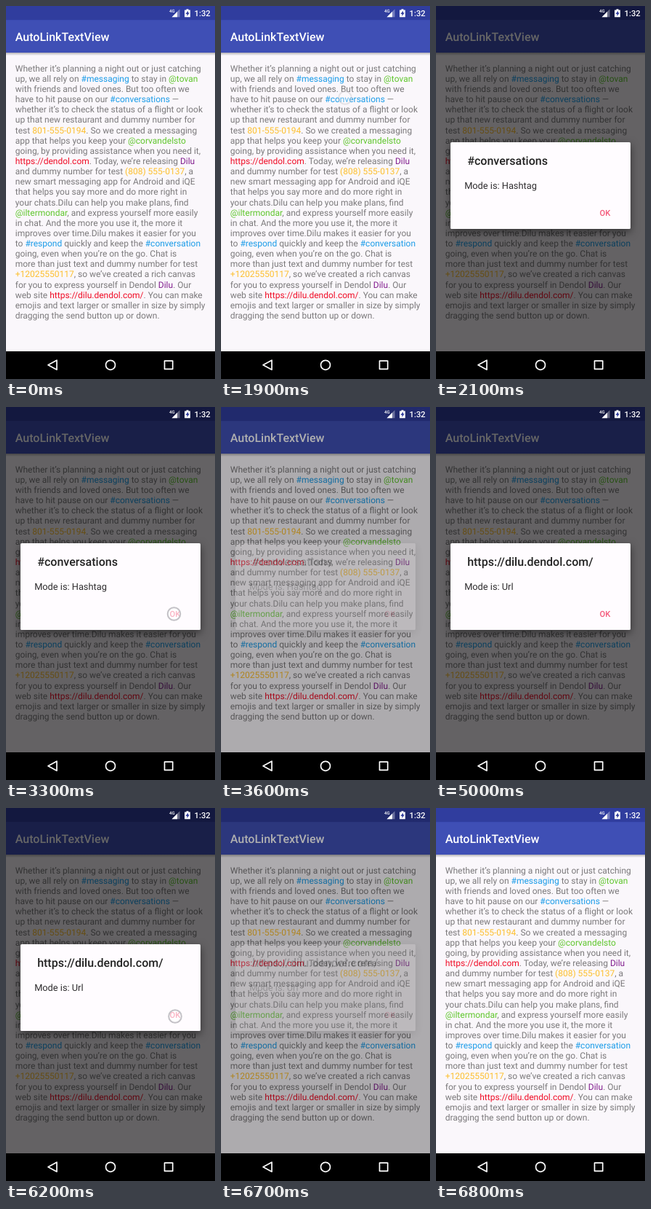
An HTML page that plays this animation: 288x512 px, repeating every 8 s.

```html
<!DOCTYPE html>
<html lang="en">
<head>
<meta charset="utf-8">
<title>AutoLinkTextView</title>
<style>
  html, body { margin: 0; width: 100%; height: 100%; overflow: hidden; background: #000; }
  svg { display: block; width: 288px; height: 512px; }
  /* the tiny turn keeps baselines from snapping to whole pixels */
  text {
    font-family: Roboto, sans-serif; white-space: pre;
    text-rendering: geometricPrecision; transform: rotate(.01deg);
  }
  .bold { font-weight: 500; }
  #body { font-size: 12px; fill: #7b797b; }
  .hash { fill: #1b9ce8; }
  .at { fill: #5fc62c; }
  .tel { fill: #fdbf2d; }
  .url { fill: #f00c26; }
  .own { fill: #83208f; }
  .pressed { fill: #c6c3c7; }
  #dialog rect { filter: drop-shadow(0 4px 6px rgba(0, 0, 0, .5)); }
  #ring { fill: rgba(255, 255, 255, .55); stroke: #c3c1c6; stroke-width: 2; }
</style>
</head>
<body>
<svg viewBox="0 0 288 512">
  <defs>
    <linearGradient id="shade" x2="0" y2="1">
      <stop stop-opacity=".28"/>
      <stop offset="1" stop-opacity="0"/>
    </linearGradient>
  </defs>

  <rect width="288" height="512" fill="#faf7fb"/>
  <rect y="64" width="288" height="4" fill="url(#shade)"/>
  <rect width="288" height="64" fill="#3f4fb5"/>
  <rect width="288" height="19.2" fill="#303d9e"/>
  <text class="bold" x="12.8" y="48" font-size="16" fill="#fff">AutoLinkTextView</text>
  <g id="body"></g>

  <rect id="dim" width="288" height="474" opacity="0"/>

  <g id="dialog" opacity="0">
    <rect x="20" y="187" width="248" height="119" rx="1.6" fill="#fffcff"/>
    <text id="title" class="bold" x="43.2" y="218" font-size="16" fill="#222"></text>
    <text id="mode" x="39.2" y="250.5" font-size="12.8" fill="#2e2c2e"></text>
    <text id="ok" class="bold" x="233" y="288" font-size="11.2" text-anchor="middle" fill="#f4587a">OK</text>
  </g>
  <circle id="ring" r="8.8" opacity="0"/>

  <g fill="#fff">
    <path d="M228.5 15.2L239.5 4.2V15.2Z" opacity=".35"/>
    <path d="M228.5 15.2L236 7.7V15.2Z"/>
    <text class="bold" x="225" y="9" font-size="6">4G</text>
    <path d="M248.5 4.2h3v1.2h2.4v9.8h-7.8V5.4h2.4Z"/>
    <text class="bold" x="259.6" y="13.6" font-size="11.2">1:32</text>
  </g>
  <path d="M251 6.4L247.4 11.1H249.5V14L252.8 9.2H251Z" fill="#303d9e"/>

  <rect y="474" width="288" height="38"/>
  <g fill="none" stroke="#fff" stroke-width="1.7" stroke-linejoin="round">
    <path d="M58 492.7L70 486.2V499.2Z"/>
    <circle cx="144" cy="492.8" r="6.5"/>
    <rect x="218.5" y="487.1" width="11.2" height="11.2"/>
  </g>
</svg>

<script>
const $ = id => document.getElementById(id);
const SITE = "https://dilu.dendol.com/";

// [kind|text] marks a coloured link
const lines = `Whether it’s planning a night out or just catching
up, we all rely on [hash|#messaging] to stay in [at|@tovan]
with friends and loved ones. But too often we
have to hit pause on our [hash|#conversations] —
whether it’s to check the status of a flight or look
up that new restaurant and dummy number for
test [tel|801-555-0194]. So we created a messaging
app that helps you keep your [at|@corvandelsto]
going, by providing assistance when you need it,
[url|https://dendol.com]. Today, we’re releasing [own|Dilu]
and dummy number for test [tel|(808) 555-0137], a
new smart messaging app for Android and iQE
that helps you say more and do more right in
your chats.Dilu can help you make plans, find
[at|@iltermondar], and express yourself more easily
in chat. And the more you use it, the more it
improves over time.Dilu makes it easier for you
to [hash|#respond] quickly and keep the [hash|#conversation]
going, even when you’re on the go. Chat is
more than just text and dummy number for test
[tel|+12025550117], so we’ve created a rich canvas
for you to express yourself in Dendol [own|Dilu]. Our
web site [url|${SITE}]. You can make
emojis and text larger or smaller in size by simply
dragging the send button up or down.`.split("\n");

$("body").innerHTML = lines.map((line, i) => {
  const spans = line.replace(/\[(\w+)\|([^\]]+)\]/g, '<tspan class="$1">$2</tspan>');
  return `<text x="12.8" y="${(89.8 + i * 14.133).toFixed(2)}">${spans}</text>`;
}).join("");

const links = [...document.querySelectorAll("#body tspan")];
const tag = links.find(s => s.textContent === "#conversations");
const site = links.find(s => s.textContent === SITE);

const hashtag = ["#conversations", "Mode is: Hashtag"];
const url = [SITE, "Mode is: Url"];
const open = { dim: .6, show: 1 };
const leaving = { dim: .31, show: .18 };

const steps = [
  { at: 0 },
  { at: 1700, ring: [171, 126, 1], press: tag },
  { at: 1900, ring: [171, 126, .4] },
  { at: 2100, ...open, info: hashtag },
  { at: 3300, ...open, info: hashtag, ring: [231.5, 284, 1] },
  { at: 3600, ...leaving, info: hashtag },
  { at: 3700 },
  { at: 4600, ring: [163, 397, .6] },
  { at: 4700, ring: [163, 397, 1], press: site },
  { at: 4900, dim: .3, show: .5, info: url },
  { at: 5000, ...open, info: url },
  { at: 6200, ...open, info: url, ring: [233, 286, 1] },
  { at: 6500, ...open, info: url, ring: [233, 286, 1], ok: "#e8335c" },
  { at: 6700, ...leaving, info: url },
  { at: 6800 }
];

function show({ dim = 0, show = 0, info = hashtag, ring = [0, 0, 0], press, ok = "#f4587a" }) {
  $("dim").setAttribute("opacity", dim);
  $("dialog").setAttribute("opacity", show);
  $("title").textContent = info[0];
  $("mode").textContent = info[1];
  $("ok").setAttribute("fill", ok);
  const [x, y, alpha] = ring;
  $("ring").setAttribute("transform", `translate(${x} ${y})`);
  $("ring").setAttribute("opacity", alpha);
  for (const link of [tag, site]) link.classList.toggle("pressed", link === press);
}

const start = performance.now();
let current;
function tick() {
  const t = (performance.now() - start) % 8000;
  const step = steps.filter(s => s.at <= t).pop();
  if (step !== current) show(current = step);
  requestAnimationFrame(tick);
}
tick();
</script>
</body>
</html>
```
